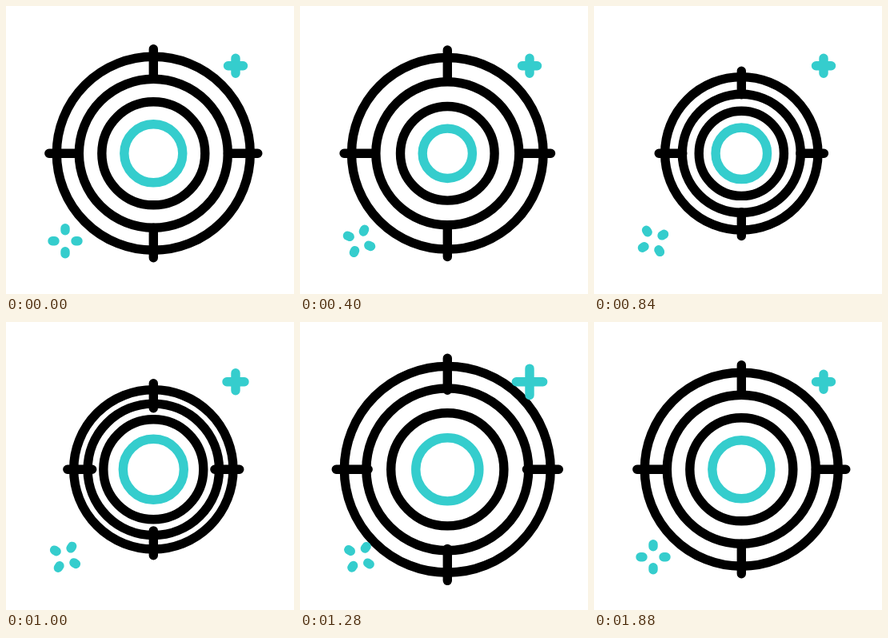
These frames come from a looping animation (360 px wide and 360 px high, 2000 ms). An HTML page:

```html
<!DOCTYPE html>
<html lang="en">
<head>
<meta charset="utf-8">
<title>Pulsing target</title>
<style>
  html, body { margin: 0; width: 100%; height: 100%; overflow: hidden; background: #fff; }
  svg { display: block; width: 100%; height: 100%; fill: none; stroke-width: 11.4; stroke-linecap: round; }
  .dark { stroke: #000; }
  .teal { stroke: #35cdcd; }
</style>
</head>
<body>
<svg viewBox="0 0 360 360">
  <g transform="translate(184.3 184.3)">
    <circle class="ring teal"/>
    <circle class="ring dark"/>
    <circle class="ring dark"/>
    <circle class="ring dark"/>
    <path id="ticks" class="dark"/>
  </g>
  <path id="plus" class="teal" transform="translate(287 74.8)"/>
  <path id="sparkle" class="teal"/>
</svg>
<script>
const LOOP = 2000;
const RADII = [36.5, 64.5, 93, 121];
const STAGGER = 80;
const PULSE = [[66, 1], [620, 0.79], [1174, 1.095], [1580, 1]];
const GROW = [[816, 9.5], [1374, 17], [1780, 9.5]];
const TURN = [[40, 0], [1800, 360]];

const rings = document.querySelectorAll('.ring');
const ticks = document.getElementById('ticks');
const plus = document.getElementById('plus');
const sparkle = document.getElementById('sparkle');

const clamp = p => Math.min(1, Math.max(0, p));

// cubic-bezier(.5, 0, .5, 1), solved by bisection
function ease(p) {
  let lo = 0, hi = 1;
  for (let i = 0; i < 24; i++) {
    const u = (lo + hi) / 2;
    if (1.5 * u * (1 - u) + u ** 3 < p) lo = u; else hi = u;
  }
  return lo * lo * (3 - 2 * lo);
}

// Eased value at time t along a list of [time, value] keys
function track(keys, t) {
  let value = keys[0][1];
  for (let i = 1; i < keys.length; i++) {
    const [t0, a] = keys[i - 1], [t1, b] = keys[i];
    if (t >= t0) value = a + (b - a) * ease(clamp((t - t0) / (t1 - t0)));
  }
  return value;
}

// Four radial strokes at right angles, between two distances
const spokes = (from, to) =>
  [[0, -1], [1, 0], [0, 1], [-1, 0]]
    .map(([x, y]) => `M${x * from} ${y * from}L${x * to} ${y * to}`).join('');

function draw(t) {
  let scale = 1;
  rings.forEach((ring, i) => {
    scale = track(PULSE, t - i * STAGGER);
    ring.setAttribute('r', RADII[i] * scale);
  });
  ticks.setAttribute('d', spokes(93 * scale, 130.5 * scale));
  plus.setAttribute('d', spokes(0, track(GROW, t)));
  sparkle.setAttribute('transform', `translate(74 293.8) rotate(${track(TURN, t)})`);
}

sparkle.setAttribute('d', spokes(13, 16));

const start = performance.now();
function frame() {
  draw((performance.now() - start) % LOOP);
  requestAnimationFrame(frame);
}
frame();
</script>
</body>
</html>
```
